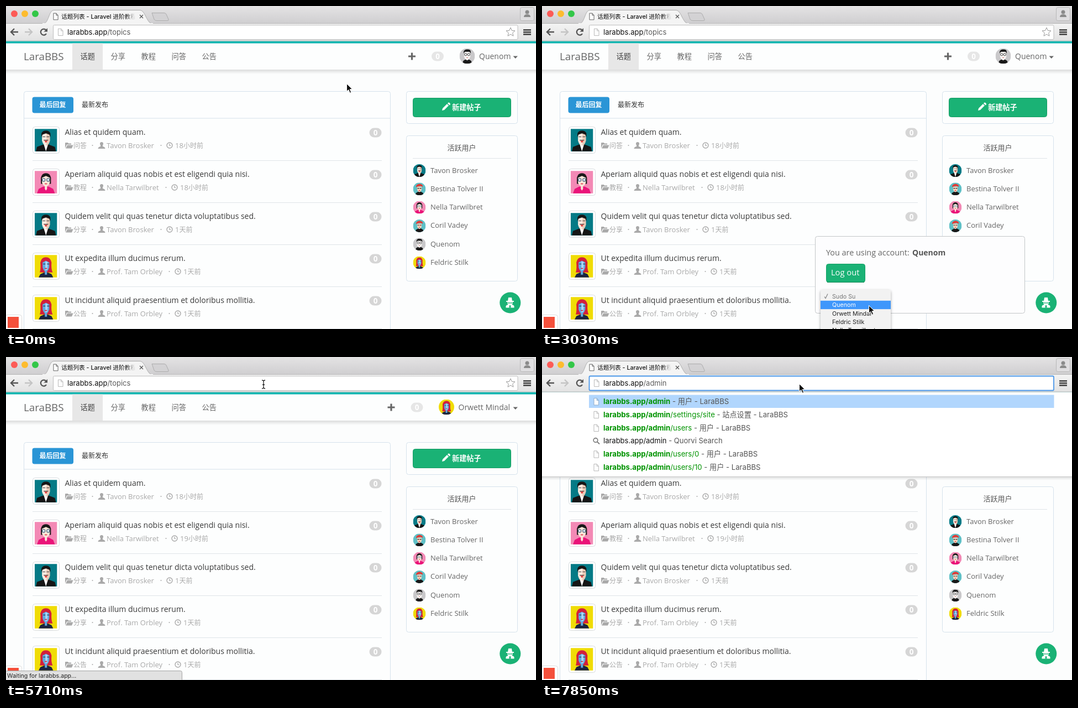
An HTML page that plays this animation: 959 by 584 pixels, repeating every 8 s.

```html
<!DOCTYPE html>
<html lang="zh">
<head>
<meta charset="utf-8">
<title>LaraBBS</title>
<style>
html, body { margin: 0; width: 100%; height: 100%; overflow: hidden; background: #fcfdfd; }
svg { display: block; }
text { white-space: pre; }
.b { font-family: "Open Sans", "Noto Sans CJK SC", sans-serif; }
.c { font-family: "Noto Sans CJK SC", "Noto Sans CJK", sans-serif; }
.i { font-family: Inter, "Noto Sans CJK SC", sans-serif; }
</style>
</head>
<body>
<svg width="959" height="584" viewBox="0 0 959 584">
  <defs>
    <linearGradient id="strip" x2="0" y2="1"><stop stop-color="#e4e3e4"/><stop offset="1" stop-color="#cfced0"/></linearGradient>
    <linearGradient id="bar" x2="0" y2="1"><stop stop-color="#f4f4f4"/><stop offset="1" stop-color="#e2e2e2"/></linearGradient>
    <linearGradient id="drop" x2="0" y2="1"><stop stop-color="#000" stop-opacity=".13"/><stop offset="1" stop-color="#000" stop-opacity="0"/></linearGradient>
    <linearGradient id="fade"><stop stop-color="#f4f4f4" stop-opacity="0"/><stop offset="1" stop-color="#f4f4f4"/></linearGradient>
    <linearGradient id="dark" x2="0" y2="1"><stop stop-color="#515151"/><stop offset=".45" stop-color="#3a3a3a"/><stop offset="1" stop-color="#2a2a2a"/></linearGradient>
    <linearGradient id="blue" x2="0" y2="1"><stop stop-color="#6cb2fb"/><stop offset="1" stop-color="#1c76f3"/></linearGradient>
    <filter id="soft" x="-20%" y="-20%" width="140%" height="140%"><feDropShadow dx="0" dy="2" stdDeviation="2.5" flood-opacity=".35"/></filter>
    <clipPath id="round" clipPathUnits="objectBoundingBox"><circle cx=".5" cy=".5" r=".5"/></clipPath>

    <symbol id="teal" viewBox="0 0 40 40">
      <path fill="#047a86" d="M0 0h40v40H0z"/><path fill="#161616" d="M2 40l2-8 11-4h10l11 4 2 8z"/>
      <path fill="#fff" d="M16 27h8l-4 13z"/><path fill="#fbeadf" d="M13 8h14v13q-2 8-7 9-5-1-7-9z"/>
      <path fill="#e9c9b6" d="M21 8h6v13q-2 8-6 9z"/><path fill="#161616" d="M12 15V8q2-5 8-5t8 5v7l-2-5-6-2-6 2z"/>
      <path stroke="#444" d="M14 14h5m2 0h5"/><path fill="#d83232" d="M17 21h6l-3 4z"/><path stroke="#333" d="M16 20h8"/>
    </symbol>
    <symbol id="pink" viewBox="0 0 40 40">
      <path fill="#f389b5" d="M0 0h40v40H0z"/><path fill="#191919" d="M11 23V12q2-8 9-8t9 8v11z"/>
      <path fill="#ea1479" d="M4 40l3-8 8-4h10l8 4 3 8z"/><path fill="#fbe6d8" d="M13 12l7-3 7 3v9q-2 5-5 6v5l-2 3-2-3v-5q-3-1-5-6z"/>
      <g fill="#e6eef0" stroke="#357"><circle cx="16" cy="16" r="2.6"/><circle cx="24" cy="16" r="2.6"/></g><path stroke="#d8233a" stroke-width="1.6" d="M18 23h4"/>
    </symbol>
    <symbol id="yellow" viewBox="0 0 40 40">
      <path fill="#f0dc05" d="M0 0h40v40H0z"/><path fill="#d21f3c" d="M9 31q2-6 1-18 2-9 10-9t10 9q-1 12 2 18z"/>
      <path fill="#1c2440" d="M7 40l3-6 7-3h6l7 3 3 6z"/><path fill="#5fa9e0" d="M14 13l6-3 6 3v9q-2 6-4 7v6h-4v-6q-2-1-4-7z"/>
      <path fill="#a9d8f5" d="M19 11l4 1v14l-4 2z"/><path stroke="#223" d="M15 16h4m3 0h4"/><path stroke="#c91f3c" stroke-width="1.6" d="M18 24h4"/>
    </symbol>
    <symbol id="aqua" viewBox="0 0 40 40">
      <path fill="#5fc0c6" d="M0 0h40v40H0z"/><path fill="#181818" d="M6 40l4-8 7-4h7l7 4 3 8z"/>
      <path fill="#f6d3bd" d="M13 13h14v9q-2 7-7 8-5-1-7-8z"/><path fill="#e33a35" d="M9 14q1-9 12-10 10 2 10 9l-9-2z"/>
      <path stroke="#222" stroke-width="2" d="M14 18h5m2 0h5"/><path stroke="#d42b32" stroke-width="2" d="M18 25h4"/>
    </symbol>
    <symbol id="grey" viewBox="0 0 40 40">
      <path fill="#c9c8ca" d="M0 0h40v40H0z"/><path fill="#191919" d="M7 40l3-8 7-4h6l7 4 3 8z"/>
      <path fill="#f9f6f4" d="M12 9h16v12q-2 8-8 10-6-2-8-10z"/><path fill="#191919" d="M11 14V8q3-6 10-5 8 0 8 6v5l-3-5H14z"/>
      <g fill="#fff" stroke="#222" stroke-width="1.3"><circle cx="16" cy="16" r="3"/><circle cx="24" cy="16" r="3"/></g><path stroke="#c66" stroke-width="1.5" d="M18 24h4"/>
    </symbol>
    <symbol id="page" viewBox="0 0 10 14" overflow="visible"><path fill="#fff" stroke="currentColor" d="M.5.5h5.5l3.5 4v9h-9zM6 .5v4h3.5"/></symbol>
  </defs>
  <g id="stage"></g>
</svg>
<script>
const LOOP = 8000, TICK = 178.1;
const GREEN = '#1ab275', LINE = '#d6e2ec', MUTED = '#a9a9a9', SOFT = '#666';
const USER = 'Quenom', OTHER = 'Orwett Mindal';
const TAVON = 'Tavon Brosker', NELLA = 'Nella Tarwilbret', PROF = 'Prof. Tam Orbley', FELDRIC = 'Feldric Stilk';

const topics = [
  ['teal', 'Alias et quidem quam.', '问答', TAVON, 270],
  ['pink', 'Aperiam aliquid quas nobis et est eligendi quia nisi.', '教程', NELLA, 279],
  ['teal', 'Quidem velit qui quas tenetur dicta voluptatibus sed.', '分享', TAVON, 270],
  ['yellow', 'Ut expedita illum ducimus rerum.', '分享', PROF, 285],
  ['yellow', 'Ut incidunt aliquid praesentium et doloribus mollitia.', '公告', PROF, 285]
];
const active = [['teal', TAVON], ['aqua', 'Bestina Tolver II'], ['pink', NELLA],
  ['aqua', 'Coril Vadey'], ['grey', USER], ['yellow', FELDRIC]];

// Pointer keys: tick, x, y
const path = [[2, 616, 140], [8, 916, 532], [9, 916, 532], [13, 572, 523], [15, 572, 523],
  [17, 591, 541], [19, 592, 555], [21, 592, 555], [25, 533, 185], [32, 465, 48]];

const text = (s, x, y, size, fill, font = 'b', more = '') =>
  `<text class="${font}" x="${x}" y="${y}" font-size="${size}" fill="${fill}" ${more}>${s}</text>`;
const rect = (x, y, w, h, fill, more = '') =>
  `<rect x="${x}" y="${y}" width="${w}" height="${h}" fill="${fill}" ${more}/>`;
const box = (x, y, w, h, fill, line, r = 4) => rect(x + .5, y + .5, w - 1, h - 1, fill, `stroke="${line}" rx="${r}"`);
const draw = (d, stroke, width = 1, more = '') =>
  `<path d="${d}" fill="none" stroke="${stroke}" stroke-width="${width}" ${more}/>`;
const fill = (d, color, more = '') => `<path d="${d}" fill="${color}" ${more}/>`;
const circle = (x, y, r, color, more = '') => `<circle cx="${x}" cy="${y}" r="${r}" fill="${color}" ${more}/>`;
const use = (id, x, y, w, h, more = '') => `<use href="#${id}" x="${x}" y="${y}" width="${w}" height="${h}" ${more}/>`;
const face = (id, x, y, r) => use(id, x - r, y - r, 2 * r, 2 * r, 'clip-path="url(#round)"');
const badge = (x, y, color) => rect(x - 11, y - 8.5, 22, 17, color, 'rx="8.5"') +
  text('0', x, y + 5, 13.5, '#fff', 'b', 'font-weight="700" text-anchor="middle"');

// What the address bar holds after the host, and the right end of it
const typedAt = n => n < 38 ? 'topics' : n === 38 ? 'a' : n === 39 ? 'adm' : 'admin';
const caretX = { topics: 225.5, a: 195.5, adm: 214.5, admin: 225.5 };

function browser(n) {
  const loading = n >= 21 && n < 29, focus = n >= 33;
  let s = rect(0, 0, 959, 32, 'url(#strip)') + rect(0, 31, 959, 32, 'url(#bar)') + rect(0, 62.5, 959, 1, '#b9b9b9') +
    draw('M0 31.5H959', '#b4b4b4') +
    ['#fc5b57', '#fdbc2f', '#33c748'].map((c, i) => circle(15 + 19 * i, 14, 6, c)).join('') +
    fill('M68 32C78 30 77 7.5 87 7.5H242C252 7.5 254 30 264 32Z', '#f4f4f4', 'stroke="#adadad"') + rect(66, 31, 200, 2, '#f4f4f4') +
    fill('M264 12.5H286Q289 12.5 290 15L294 24Q295 26.5 292 26.5H273Q269 26.5 268 24Z', '#d3d2d4', 'stroke="#adadad"') +
    text('话题列表 - Laravel 进阶教程', 100, 23, 10.7, '#111', 'i', 'font-weight="500"') +
    rect(216, 9, 18, 20, 'url(#fade)') + rect(234, 9, 6, 20, '#f4f4f4') + draw('M242 16l6 6m0-6l-6 6', '#555', 1.3) +
    (loading ? draw('M-6 0A6 6 0 0 1 4 -4.5', '#8da2bd', 2, `transform="translate(91 19) rotate(${(n - 25) * 65})"`)
             : use('page', 85.5, 12.5, 9, 13, 'color="#555"')) +
    box(930, 2, 26, 25, '#dfdee0', '#b7b7b7', 3) + circle(943, 11, 3.5, '#8b8b8b') + fill('M937 20q0-5 6-5t6 5z', '#8b8b8b') +
    draw('M22 47H9m6-6l-6 6 6 6', '#555', 2.4) + draw('M34 47h13m-6-6l6 6-6 6', '#c4c4c4', 2.4) +
    (loading ? draw('M62.5 41.5l11 11m0-11l-11 11', '#555', 2.8)
             : draw('M73 50A5.5 5.5 0 1 1 72.5 43.5', '#555', 2.3) + fill('M75 40v6.5h-6.5z', '#555')) +
    [42, 46, 50].map(y => rect(936, y, 14, 2.6, '#444')).join('') +
    rect(85.5, 34.5, 840.5, 26, '#fff', focus ? 'stroke="#4b97e8" stroke-width="1.8" rx="2"' : 'stroke="#bebebe" rx="2"') +
    use('page', 94, 40.5, 9.5, 13.5, 'color="#b5b5b5"');
  if (!focus) s += draw('M913 39l2.3 5.3 5.7.5-4.3 3.8 1.3 5.6-5-3-5 3 1.3-5.6-4.3-3.8 5.7-.5z', '#999');
  if (n === 33) s += rect(111, 39, 115, 16, '#b4d5fe');
  if (n >= 35 && n < 38) s += rect(188, 39, 38, 16, '#b4d5fe');
  const typed = typedAt(n), end = caretX[typed];
  s += text(`larabbs.app<tspan fill="#5c5c5c">/${typed}</tspan>`, 111, 52, 13, '#111', 'i');
  if (n >= 38 && n < 41) s += rect(188, 54, end - 188, 1, '#555');
  if (n === 34 || n >= 38 && n < 44) s += rect(end - .5, 39, 1, 16, '#111');
  return s;
}

function header(moved) {
  const dx = moved ? -37.5 : 0;
  return rect(0, 115, 959, 8, 'url(#drop)') + rect(0, 67, 959, 48, '#fdfefe') + rect(0, 63.5, 959, 4, '#12b5b0') +
    text('LaraBBS', 32, 98, 18.8, SOFT) + rect(120, 67.5, 55, 47.5, '#e7e7e7') +
    ['话题', '分享', '教程', '问答', '公告'].map((s, i) => text(s, 134.5 + 55 * i, 96, 13.2, i ? SOFT : '#444', 'c')).join('') +
    `<g transform="translate(${dx})">` + draw('M728 91h13m-6.5-6.5v13', SOFT, 3.2) + badge(781, 91, '#e6e6e6') +
    face(moved ? 'yellow' : 'grey', 834.5, 90.5, 14) + text(moved ? OTHER : USER, 856, 96, 14, SOFT) + '</g>' +
    fill('M917.5 90.5h8.5l-4.25 4.5z', SOFT);
}

function topic([pic, title, kind, name, end], i, moved) {
  const age = i > 1 ? '1' : i && moved ? '19' : '18';
  return `<g transform="translate(0 ${76 * i})">` + box(48, 218, 49, 49, '#fff', '#d9dde0') + use(pic, 52, 222, 40.5, 41) +
    text(title, 106.5, 233, 14, '#3a3a3a') + badge(668.5, 229, '#d6d6d6') +
    fill('M107 257V248q0-1 1-1h4l1 1.5h5v2h-8l-3 6.5M108 257.5l3-6h10.5l-2.5 6z', MUTED) + text(kind, 122, 257, 12, MUTED, 'c') +
    circle(156.5, 252, 1, MUTED) + circle(173, 249, 3, MUTED) + fill('M166.5 258q0-3 4.500-4v-3h4v3q4.5 1 4.5 4z', MUTED) +
    text(name, 182, 257, 13, MUTED) + circle(end + 10.5, 252, 1, MUTED) +
    circle(end + 26, 252, 5, 'none', `stroke="${MUTED}" stroke-width="1.4"`) + draw(`M${end + 26} 249v3.5h2.5`, MUTED, 1.2) +
    text(age, end + 36, 257, 13, MUTED) + text(i > 1 ? '天前' : '小时前', end + 36 + 7.5 * age.length, 257, 12, MUTED, 'c') +
    rect(48, 279, 632, 1, '#dfe4e8') + '</g>';
}

function page(moved) {
  const bold = 'font-weight="700"';
  return rect(0, 63, 959, 521, '#fcfdfd') + header(moved) +
    box(32, 154, 664, 460, '#fdfefe', LINE) + rect(33, 202.5, 662, 1, LINE) +
    rect(47.5, 164.5, 74.5, 29, '#2a95d6', 'rx="4"') + text('最后回复', 60.5, 182.5, 12, '#fff', 'c', bold) +
    text('最新发布', 137, 182.5, 12, '#333', 'c') + topics.map((t, i) => topic(t, i, moved)).join('') +
    box(724, 154, 202, 59, '#fdfefe', LINE) + box(736, 166, 178, 35, GREEN, '#149a63') +
    fill('M789 189l1-4 8-8 3 3-8 8zM799 176l1.5-1.5q1-.5 2.5 1t1 2.5l-1.5 1.5z', '#fff') +
    text('新建帖子', 807, 188, 13.2, '#fff', 'c', bold) +
    box(724, 234, 202, 264, '#fdfefe', LINE) + text('活跃用户', 824.5, 261, 13, '#555', 'c', 'text-anchor="middle"') +
    rect(736, 275, 178, 1, '#dfe4e8') +
    active.map(([pic, name], i) => face(pic, 748, 297.5 + 33.3 * i, 11.5) + text(name, 768, 301.5 + 33.3 * i, 13, SOFT)).join('') +
    box(-2, 558, 31, 30, '#fff', '#ddd') + rect(3, 562, 20, 20, '#f4503b');
}

const agent = () => circle(912.3, 536.5, 19, GREEN) +
  fill('M908 533l1-5.5q1.5-1.5 3 0 1.5-1.500 3 0l1 5.500zM905 533h14v2h-14zM907.5 535h9v3q-1 3-4.5 3.500-3.500-.5-4.500-3.500zM904.500 545.500v-3q1-2.500 4-2.500h7q3 0 4 2.500v3z', '#fff') +
  fill('M908.5 536h3v1.800h-2.500zM912.5 536h3l-.5 1.800h-2.500zM911 541h2l.7 4.500h-3.4z', GREEN);

function account(n) {
  const chosen = n >= 21;
  return box(494, 416, 380, 140, '#fdfdfe', '#c3c6c8') +
    text('You are using account:', 514, 451, 14.4, SOFT) + text(USER, 670, 451, 14, '#555', 'b', 'font-weight="700"') +
    box(514, 466, 71, 34, GREEN, '#14a166') + rect(516, 499, 67, 1, '#0e8553') + text('Log out', 523, 487, 14.7, '#fff') +
    rect(514.5, 518, 113.5, 16, '#fff', chosen ? 'stroke="#7fb0e6" stroke-width="2" rx="3.5"' : 'stroke="#cfcfcf" rx="3.5"') +
    rect(614, 517.5, 14.5, 17, 'url(#blue)', 'rx="3"') +
    draw('M618.5 524l2.7-3 2.7 3m-5.4 4l2.7 3 2.7-3', '#fff', 1.3) +
    text(chosen ? OTHER : 'Sudo Su', 521.5, 530, 10.7, '#111', 'i');
}

function menu(n) {
  const pick = n < 17 ? 0 : n < 19 ? 1 : 2;
  return rect(504, 513, 127, 90, '#f2f2f2', 'rx="4" filter="url(#soft)"') + (pick ? rect(504, 517.5 + 15.3 * pick, 127, 15.3, '#3f97fb') : '') +
    draw('M511 525.5l2 3 4-8', '#888', 1.3) +
    ['Sudo Su', USER, OTHER, FELDRIC, NELLA].map((s, i) =>
      text(s, 525, 529 + 15.3 * i, 10.7, !i ? '#777' : i === pick ? '#fff' : '#222', 'i')).join('');
}

function suggestions(n) {
  const key = typedAt(n);
  const tails = n < 39 ? ['', '/users/10', '/settings/site', '/users', null, '/users/0']
                       : ['', '/settings/site', '/users', null, '/users/0', '/users/10'];
  return rect(0, 216, 959, 7, 'url(#drop)') + rect(0, 63.5, 959, 152.5, '#fff') + rect(0, 216, 959, 1, '#c6c6c6') +
    rect(85, 68.5, 841.5, 23.5, '#b1d6fd') +
    tails.map((tail, i) => {
      const y = 85 + 23.8 * i;
      if (tail === null) return circle(97, y - 6, 3.8, 'none', 'stroke="#777" stroke-width="1.6"') +
        draw(`M100 ${y - 3}l4 4`, '#777', 2) + text(`larabbs.app/${key}<tspan fill="#555"> - Quorvi Search</tspan>`, 111, y, 13, '#111', 'i');
      const site = tail === '/settings/site' ? '站点设置' : '用户';
      return use('page', 93.5, y - 11, 9.5, 13.5, `color="${i ? '#b5b5b5' : '#8ba9c9'}"`) +
        text(`<tspan font-weight="700">larabbs.app/${key}</tspan>${'admin'.slice(key.length)}${tail}<tspan fill="#555"> - ${site} - LaraBBS</tspan>`,
          111, y, 13.15, '#009300', 'i');
    }).join('');
}

function composer(n) {
  const typed = typedAt(n), light = 'font-weight="300"';
  const words = [[198, '啊'], [245, '阿'], [295, '吖'], [344, '( ⊙ o ⊙ )啊!'], [494, 'K42 仿生'], [602, '嗄'], [652, '锕'], [699, '腌'], [749, '錒']];
  return rect(188, 57, 642, 66, 'url(#dark)', 'rx="3" filter="url(#soft)"') +
    text(typed, 197, 81, 20, '#fff', 'c', light) + rect({ a: 207, adm: 238, admin: 255 }[typed], 61, 1, 25, '#fff') +
    words.map(([x, s], i) => text(`${i + 1}.${s}`, x, 112, 19.5, i ? '#fff' : '#2aa9ee', 'c', light)).join('') +
    draw('M806 107.5l-4 3.5 4 3.5', '#bbb', 2) + draw('M813 107.5l4 3.5-4 3.5', '#2aa9ee', 2);
}

function pointer(n) {
  let k = path.findIndex(p => p[0] > n);
  if (k < 0) k = path.length;
  const a = path[Math.max(k - 1, 0)], b = path[Math.min(k, path.length - 1)];
  const u = b[0] > a[0] ? (n - a[0]) / (b[0] - a[0]) : 0, e = u * u * (3 - 2 * u);
  const x = a[1] + (b[1] - a[1]) * e, y = a[2] + (b[2] - a[2]) * e;
  const at = `transform="translate(${x} ${y})"`;
  if (y < 61 && n < 38) return draw('M-2 -6q3 0 3 2 0-2 3-2M1 -4V7M-2 9q3 0 3-2 0 2 3 2M-1 2h4', '#222', 1.3, at);
  return fill('M.5 .5V14.5l3.3-3 2.5 5.7 2.4-1-2.4-5.6h4.4z', '#111', `stroke="#fff" ${at}`);
}

function scene(n) {
  const moved = n >= 29;
  let s = page(moved);
  if (n >= 9 && !moved) s += account(n);
  s += agent();
  if (n >= 15 && n < 21) s += menu(n);
  if (n >= 27 && n < 33) s += box(-2, 567, 321, 20, '#e1e1e1', '#a5a5a5', 3) + text('Waiting for larabbs.app...', 2, 579.5, 10.6, '#222', 'i');
  if (n >= 38) s += suggestions(n);
  s += browser(n);
  if (n >= 38 && n < 41) s += composer(n);
  return s + pointer(n);
}

const stage = document.getElementById('stage');
let shown = -1;
function frame() {
  const n = Math.floor(performance.now() % LOOP / TICK);
  if (n !== shown) stage.innerHTML = scene(shown = n);
  requestAnimationFrame(frame);
}
frame();
</script>
</body>
</html>
```
